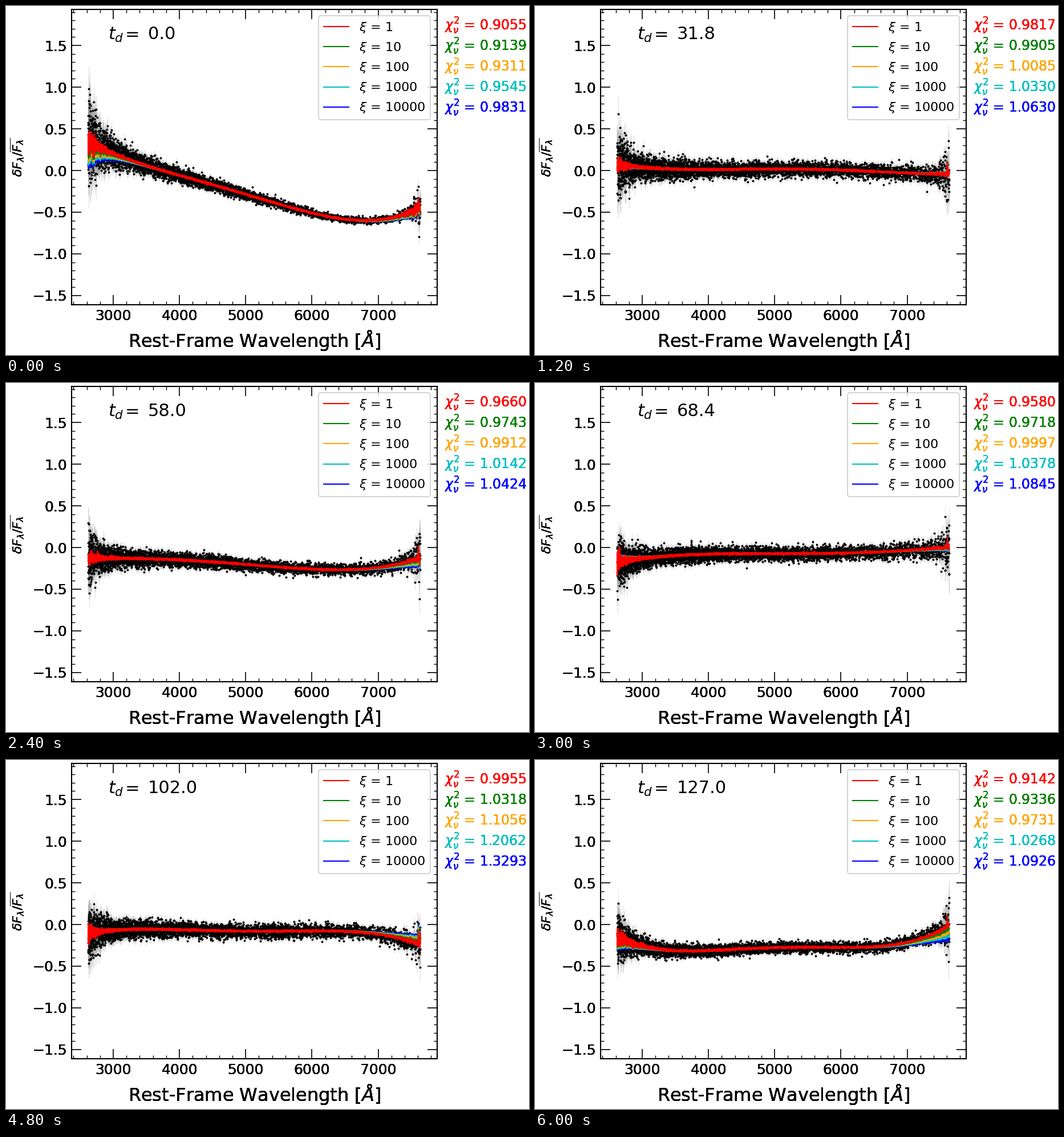
Recreate the animation shown at these times as a matplotlib script. Size 917 by 611 pixels, loop 6.2 s.

```python
import numpy as np
import matplotlib.pyplot as plt
from matplotlib.animation import FuncAnimation
from matplotlib.collections import LineCollection
from matplotlib.ticker import AutoMinorLocator, MultipleLocator

W, H, DPI = 917, 611, 100
FRAMES, STEP = 31, 200
LO, HI = 2621, 7637
COLORS = ["red", "green", "orange", "c", "blue"]
MIX = np.linspace(0, 1, len(COLORS))  # 0 for xi = 1, 1 for xi = 10000

plt.rcParams["font.family"] = "DejaVu Sans"

# Key epochs: frame, days, chi2 of the first and last fit,
# then the trend at five evenly spaced wavelengths.
EPOCHS = np.array([
    [0, 0.0, 0.9055, 0.9831, .35, -.03, -.315, -.57, -.44],
    [3, 16.9, 0.9600, 0.9713, -.05, .015, .15, .215, .20],
    [8, 41.8, 0.9961, 1.1242, .16, .01, -.07, -.155, -.21],
    [12, 58.0, 0.9660, 1.0424, -.12, -.145, -.21, -.267, -.12],
    [19, 82.2, 0.9473, 1.1407, -.25, 0, .11, .22, .17],
    [24, 102.0, 0.9955, 1.3293, -.11, -.06, -.08, -.08, -.24],
    [30, 127.0, 0.9142, 1.0926, -.15, -.315, -.275, -.27, -.01],
])

wave = np.logspace(np.log10(LO), np.log10(HI), 4644)
unit = 2 * (wave - LO) / (HI - LO) - 1
left, right = wave - LO, HI - wave


def fade(dist, scale):
    return np.exp(-dist / scale)


ERR = (0.045 + 0.13 * fade(left, 130) + 0.04 * fade(left, 600)
       + 0.15 * fade(right, 60) + 0.04 * fade(right, 300))
EDGE = fade(left, 150) + 0.5 * fade(right, 130)
SPIKE = 0.12 * np.exp(-((wave - 7607) / 5) ** 2)

fig = plt.figure(figsize=(W / DPI, H / DPI), dpi=DPI, facecolor="white")
ax = fig.add_axes([115 / W, 1 - 523 / H, 640.5 / W, 517 / H])
ax.set_xlim(2371, 7887)
ax.set_ylim(-1.61, 1.932)


def thicken(artist, times=5):
    """Overdraw an artist so its soft edges turn solid."""
    draw = artist.draw

    def repeat(renderer):
        for _ in range(times):
            draw(renderer)

    artist.draw = repeat
    return artist


def label(x, y, s, size, **kw):
    return fig.text(x / W, 1 - y / H, s, fontsize=size, va="baseline", **kw)


for axis, step in ((ax.xaxis, 1000), (ax.yaxis, 0.5)):
    axis.set_major_locator(MultipleLocator(step))
    axis.set_minor_locator(AutoMinorLocator(5))
ax.tick_params(which="both", direction="in", top=True, right=True)
ax.tick_params(which="major", length=12, width=1.2, labelsize=18, pad=6)
ax.tick_params(which="minor", length=4, width=1)
for spine in ax.spines.values():
    spine.set_linewidth(1.5)
for text in ax.get_xticklabels() + ax.get_yticklabels():
    thicken(text)

thicken(label(435.5, 597, r"Rest-Frame Wavelength [$\AA$]", 23, ha="center"))
thicken(label(29, 265, r"$\delta F_\lambda/\overline{F_\lambda}$", 16,
              ha="center", rotation=90, rotation_mode="anchor"))
label(179, 58.5, "$t_d$", 22)
label(209, 58.5, "=", 22)
days = label(249, 58.5, "", 22)
chis = [thicken(label(768, 43 + 36 * k, "", 17, color=c))
        for k, c in enumerate(COLORS)]

bars = LineCollection([], colors="gray", alpha=0.2, linewidths=1, zorder=1)
ax.add_collection(bars, autolim=False)
dots, = ax.plot([], [], "ko", ms=2.8, mew=0, zorder=2)
fits = [ax.plot([], [], color=c, lw=1.5, zorder=4 - 0.1 * k,
                label=rf"$\xi$ = {10 ** k}")[0]
        for k, c in enumerate(COLORS)]
legend = ax.legend(loc="upper right", fontsize=16)
legend.set_zorder(6)
legend.get_frame().set_linewidth(1.5)


def update(i):
    rng = np.random.default_rng(100 + i)
    day, chi_lo, chi_hi, *knots = (np.interp(i, EPOCHS[:, 0], col)
                                   for col in EPOCHS[:, 1:].T)
    trend = np.polyval(np.polyfit(np.linspace(-1, 1, 5), knots, 4), unit)

    err = ERR * (1 + trend)
    flux = trend + err * rng.standard_normal(wave.size)
    dots.set_data(wave, flux)
    bars.set_segments(np.stack([np.stack([wave, flux - err], axis=1),
                                np.stack([wave, flux + err], axis=1)], axis=1))

    # Larger xi pulls both ends of the fit back towards its middle.
    pull = 0.7 * ((knots[1] - knots[0]) * fade(left, 300)
                  + (knots[3] - knots[4]) * fade(right, 400))
    jitter = rng.standard_normal(wave.size)
    jitter *= 0.007 + (0.02 + 0.18 * np.abs(trend)) * EDGE
    for fit, mix in zip(fits, MIX):
        fit.set_data(wave, trend + mix * pull + (1 - 0.6 * mix) * jitter + SPIKE)

    days.set_text(f"{day:.1f}")
    for text, chi in zip(chis, chi_lo + (chi_hi - chi_lo) * MIX ** 1.6):
        text.set_text(rf"$\chi^2_\nu$ = {chi:.4f}")
    return [bars, dots, days, *fits, *chis]


anim = FuncAnimation(fig, update, frames=FRAMES, interval=STEP,
                     init_func=lambda: update(0), repeat=True, repeat_delay=0)
plt.show()
```
